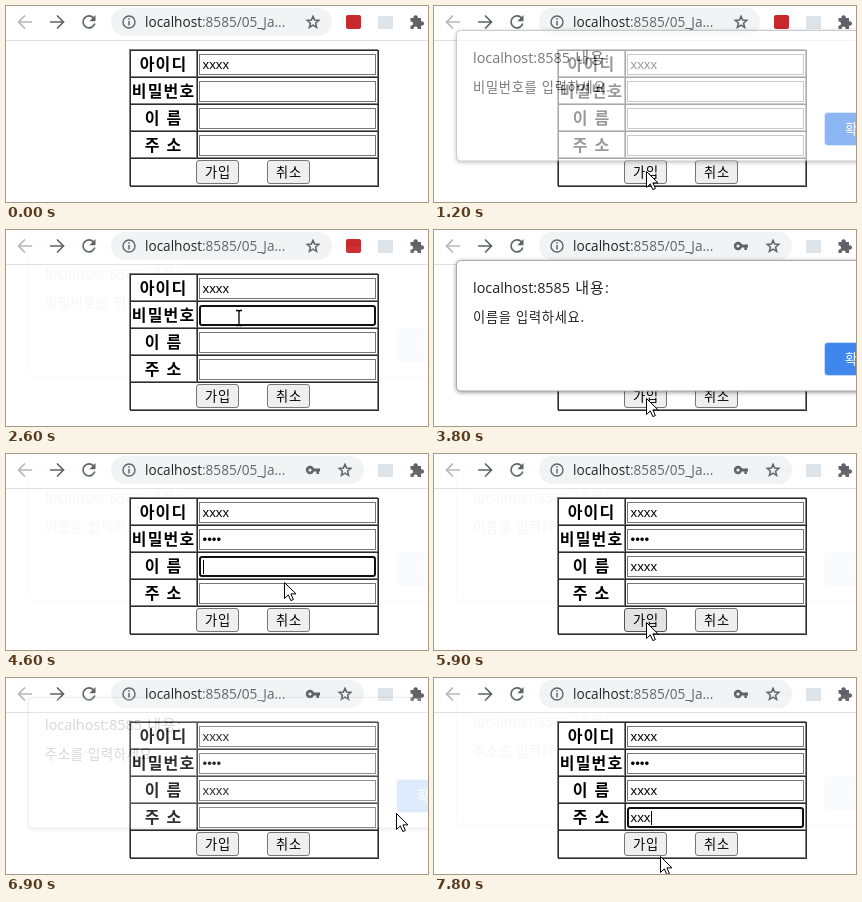
Write an HTML page that moves like this. It is 422 px wide and 196 px high and loops after 8 s.

```html
<!DOCTYPE html>
<html lang="ko">
<head>
<meta charset="utf-8">
<title>가입 폼</title>
<style>
  html, body { margin: 0; width: 100%; height: 100%; overflow: hidden; background: #fff; }
  svg { display: block; width: 422px; height: 196px; }
  text { white-space: pre; }
  .ko { font-family: "Noto Sans CJK KR", "Noto Sans CJK", sans-serif; font-weight: 350; }
  .ui { font-family: "Open Sans", "Noto Sans CJK KR", "Noto Sans CJK", sans-serif; }
  .label { font-size: 16px; font-weight: 700; letter-spacing: 1.2px; text-anchor: middle; }
  .button text { font-size: 13.2px; letter-spacing: .8px; text-anchor: middle; }
  .button rect { fill: #efefef; stroke: #767676; }
  .button.hover rect { fill: #e3e3e3; stroke: #555; }
  .value { font: 13.333px "Liberation Sans", Arial, sans-serif; }
  .field { fill: #fff; stroke: #767676; }
  .field.focus { stroke: #101010; stroke-width: 2; }
  .caret { stroke: #000; }
  .icon { fill: none; stroke: #5f6368; stroke-width: 1.7; }
</style>
</head>
<body>
<svg viewBox="0 0 422 196">
  <g id="toolbar">
    <path d="M0 34.5H422" stroke="#dfe1e4"/>
    <path class="icon" style="stroke:#b6b8bb" d="M26 16H13M19 9.5L12.5 16L19 22.5"/>
    <path class="icon" d="M44 16H57M51 9.5L57.5 16L51 22.5"/>
    <path class="icon" d="M87.6 12A6 6 0 1 0 88.8 17.5"/>
    <path d="M89.5 9V15.2H83.3Z" fill="#5f6368"/>
    <rect id="pill" x="105" y="2" width="221" height="28" rx="14" fill="#f1f3f4"/>
    <circle class="icon" cx="123" cy="16" r="6" style="stroke-width:1.4"/>
    <path class="icon" style="stroke-width:1.5" d="M123 15V19.5M123 12.3V13.8"/>
    <text class="ui" x="139" y="21" font-size="13.6" fill="#5f6368"><tspan fill="#202124">localhost</tspan>:8585/05_Ja...</text>
    <g id="key">
      <circle class="icon" cx="304" cy="16" r="2.9" style="stroke-width:2.6"/>
      <path d="M307 14.6H314V17.4H313V20H310.4V17.4H307Z" fill="#5f6368"/>
    </g>
    <path id="star" class="icon" d="M0 -6.3L1.8 -2.1L6.4 -1.7L2.9 1.4L4 5.9L0 3.5L-4 5.9L-2.9 1.4L-6.4 -1.7L-1.8 -2.1Z"/>
    <rect id="extension" x="340" y="9" width="15" height="14" rx="2" fill="#c9282d"/>
    <rect x="372" y="10" width="15" height="13" fill="#dde4ea"/>
    <path d="M404.5 12H407.5A2.2 2.2 0 1 1 411.7 12H415V15.5A2.2 2.2 0 1 1 415 19.5V23H411.5A2 2 0 1 0 407.7 23H404.5V19.5A2 2 0 1 0 404.5 15.7Z" fill="#5f6368"/>
  </g>

  <g id="form">
    <rect x="123" y="43" width="250" height="138" fill="#fff"/>
    <g id="grid"></g>
    <g id="rows"></g>
    <g class="button ko" id="join">
      <rect x="190.5" y="154.5" width="42" height="23" rx="2.5"/>
      <text x="212" y="171">가입</text>
    </g>
    <g class="button ko">
      <rect x="261.5" y="154.5" width="42" height="23" rx="2.5"/>
      <text x="283" y="171">취소</text>
    </g>
  </g>

  <g id="dialog">
    <rect x="22.5" y="30.5" width="440" height="130.5" rx="4" fill="#fff" stroke="#a9a9a9"
      style="filter:drop-shadow(0 1px 2px rgba(0,0,0,.4))"/>
    <text class="ui" x="39" y="63" font-size="14.4" fill="#202124">localhost:8585 <tspan dx="1.5" font-size="15" letter-spacing="1">내용</tspan>:</text>
    <text class="ko" id="message" x="39" y="91.5" font-size="13.2" letter-spacing=".75" fill="#202124"></text>
    <rect x="390" y="112" width="70" height="34" rx="4" fill="#c6dcfa"/>
    <rect id="ok" x="391" y="113" width="70" height="32" rx="3"/>
    <text class="ko" x="411" y="133.5" font-size="13.2" fill="#fff">확인</text>
  </g>

  <g id="cursor">
    <path id="arrow" d="M.5 .5V16.5L4.3 12.9L6.8 18.6L9.4 17.5L6.9 11.9H12Z" fill="#fff" stroke="#000"/>
    <path id="beam" d="M-3 -7.5H-1L0 -6.5L1 -7.5H3M0 -6.5V6.5M-3 7.5H-1L0 6.5L1 7.5H3" fill="none" stroke="#000" stroke-width="1.3"/>
  </g>
</svg>
<script>
const LOOP = 8000, STEP = 100;
const $ = id => document.getElementById(id);
const within = (t, from, to) => t >= from && t < to;
const show = (el, on) => el.setAttribute("visibility", on ? "visible" : "hidden");

function setAll(el, attrs) {
  for (const name in attrs) el.setAttribute(name, attrs[name]);
  return el;
}
function make(tag, parent, attrs) {
  const el = document.createElementNS("http://www.w3.org/2000/svg", tag);
  return parent.appendChild(setAll(el, attrs));
}

// every table rule is a grey line followed by a dark one
for (const [shift, stroke] of [[0, "#808080"], [1, "#2c2c2c"]]) {
  const across = [43, 70, 97, 124, 151, 179].map(y => `M${123 + shift} ${y + shift + 0.5}H${372 + shift}`);
  const down = [[123, 180], [190, 151], [371, 180]].map(([x, end]) => `M${x + shift + 0.5} ${43 + shift}V${end + shift}`);
  make("path", $("grid"), { d: across.concat(down).join(""), stroke, fill: "none" });
}

// keys: times at which each character is typed
const fields = [
  { label: "아이디", y: 48, glyph: "x", keys: [0, 0, 0, 0], focus: [0, 0] },
  { label: "비밀번호", y: 75, glyph: "•", keys: [2700, 2900, 3100, 3300], focus: [2300, 3500] },
  { label: "이 름", y: 102, glyph: "x", keys: [5000, 5200, 5400, 5600], focus: [4600, 5900] },
  { label: "주 소", y: 129, glyph: "x", keys: [7300, 7600, 7800], focus: [7000, 8000] }
];
for (const f of fields) {
  make("text", $("rows"), { class: "ko label", x: 157.6, y: f.y + 16 }).textContent = f.label;
  f.box = make("rect", $("rows"));
  f.text = make("text", $("rows"), { class: "value", x: 196.5, y: f.y + 15 });
  f.caret = make("path", $("rows"), { class: "caret" });
}

const dialogs = [
  { open: 1200, close: 2100, hover: 1900, message: "비밀번호를 입력하세요." },
  { open: 3700, close: 4400, hover: 4100, message: "이름을 입력하세요." },
  { open: 6000, close: 6800, hover: 6500, message: "주소를 입력하세요." }
];

// [time, x, y]
const path = [
  [0, 430, 75], [300, 418, 76], [1000, 212, 165], [1400, 212, 165], [2000, 413, 131],
  [2100, 413, 131], [2300, 233, 88], [2600, 233, 88], [3100, 212, 168], [3800, 212, 168],
  [4100, 411, 130], [4400, 411, 130], [4600, 278, 128], [5000, 212, 168], [6000, 212, 168],
  [6400, 380, 128], [6700, 409, 130], [6800, 409, 130], [7300, 226, 178], [8000, 226, 178]
];

function pointer(t) {
  const i = path.findIndex(p => p[0] > t);
  const [t0, x0, y0] = path[i - 1], [t1, x1, y1] = path[i];
  const k = (t - t0) / (t1 - t0), e = k * k * (3 - 2 * k);
  return [Math.round(x0 + (x1 - x0) * e), Math.round(y0 + (y1 - y0) * e)];
}

function drawField(f, t) {
  const focused = within(t, ...f.focus), inset = focused ? 1 : 0.5;
  setAll(f.box, {
    class: focused ? "field focus" : "field", rx: focused ? 2 : 0,
    x: 193 + inset, y: f.y + inset, width: 177 - 2 * inset, height: 21 - 2 * inset
  });
  f.text.textContent = f.glyph.repeat(f.keys.filter(k => k <= t).length);
  const x = Math.round(197 + f.text.getComputedTextLength()) + 0.5;
  f.caret.setAttribute("d", `M${x} ${f.y + 4}v14`);
  show(f.caret, focused && !within(t, 2600, 2700));
}

function drawDialog(t) {
  const d = dialogs.filter(d => d.open <= t).pop();
  show($("dialog"), d);
  if (!d) return;
  let opacity = 1, lift = 0;
  if (t < d.open + STEP) [opacity, lift] = [0.6, 6];
  if (t >= d.close) [opacity, lift] = [0.5, 6];
  if (t >= d.close + STEP) [opacity, lift] = [0.18, 11];
  const gone = t >= d.close + 2 * STEP;
  if (gone) [opacity, lift] = [0.035, 14];
  setAll($("dialog"), { opacity, transform: `translate(0 ${-lift})` });
  $("message").textContent = d.message;
  $("ok").setAttribute("fill", t >= d.hover ? "#4c93f0" : "#3f87ec");
  // the faint trace of a closed dialog lies behind the form
  $("form").parentNode.insertBefore($("dialog"), gone ? $("form") : $("cursor"));
}

function draw(t) {
  fields.forEach(f => drawField(f, t));
  drawDialog(t);
  const saved = t >= 2700;
  show($("key"), saved);
  show($("extension"), !saved);
  $("pill").setAttribute("width", saved ? 253 : 221);
  $("star").setAttribute("transform", `translate(${saved ? 339 : 307} 16) scale(.9)`);

  const [x, y] = pointer(t), beam = within(t, 2300, 2700);
  $("cursor").setAttribute("transform", `translate(${x} ${y})`);
  show($("cursor"), t >= 300);
  $("arrow").style.display = beam ? "none" : "";
  $("beam").style.display = beam ? "" : "none";
  const pressed = [[900, 1200], [3500, 3700], [5900, 6000]].some(w => within(t, ...w));
  $("join").classList.toggle("hover", pressed);
}

const start = performance.now();
let last = -1;
function tick() {
  const t = Math.floor((performance.now() - start) % LOOP / STEP) * STEP;
  if (t !== last) draw(last = t);
  requestAnimationFrame(tick);
}
tick();
</script>
</body>
</html>
```
